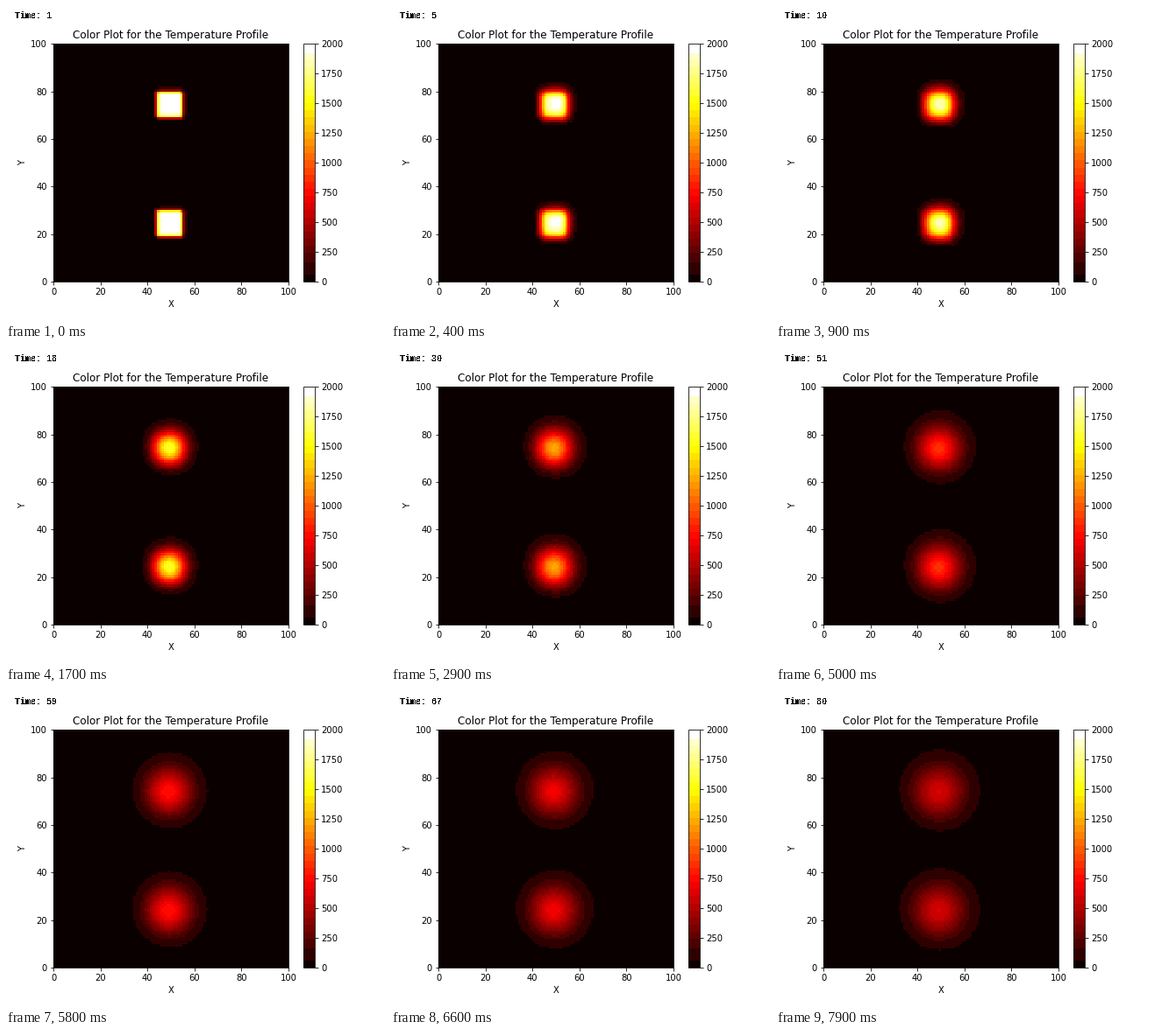
Write a matplotlib script that moves like this. It is 432 by 360 pixels and loops after 8 s.

```python
import numpy as np
import matplotlib.pyplot as plt
from matplotlib.animation import FuncAnimation
from matplotlib.colors import ListedColormap

W, H, DPI = 432, 360, 72
N, STEPS, T_MAX = 100, 80, 2000
R = 0.2  # diffusion number


def banded_hot(size=200):
    """The hot colormap reduced to flat bands."""
    edges = np.concatenate([[0, 60, 160], np.arange(240, 1960, 60), [T_MAX]])
    mids = (edges[:-1] + edges[1:]) / 2 / T_MAX
    mids[0], mids[-1] = 0, 1
    values = (np.arange(size) + 0.5) * T_MAX / size
    band = np.searchsorted(edges, values, side="right") - 1
    return ListedColormap(plt.get_cmap("hot")(mids[band]))


def simulate():
    """Explicit heat steps updated in place, sweeping right and up."""
    temp = np.zeros((N, N))
    for y in (19, 69):
        temp[y:y + 11, 44:55] = T_MAX
    # Solves the left-neighbour recursion of one row at once.
    sweep = np.linalg.inv(np.eye(N - 2) - R * np.eye(N - 2, k=-1))
    states = []
    for _ in range(STEPS):
        for i in range(1, N - 1):
            row = temp[i]
            rhs = (1 - 4 * R) * row[1:-1] + R * (
                row[2:] + temp[i + 1, 1:-1] + temp[i - 1, 1:-1])
            temp[i, 1:-1] = sweep @ rhs
        states.append(temp.copy())
    return states


states = simulate()

plt.rcParams["font.family"] = "DejaVu Sans"
fig = plt.figure(figsize=(W / DPI, H / DPI), dpi=DPI, facecolor="white")
fig.subplots_adjust(left=0.125, right=0.9, bottom=0.125, top=0.88)
ax = fig.add_subplot()
mesh = ax.pcolormesh(states[0], cmap=banded_hot(), vmin=0, vmax=T_MAX)
fig.colorbar(mesh, ax=ax)
ax.set(title="Color Plot for the Temperature Profile", xlabel="X", ylabel="Y",
       xlim=(0, N), ylim=(0, N))

clock = fig.text(10 / W, 1 - 14 / H, "", family="Liberation Mono",
                 weight="bold", size=10, va="baseline", antialiased=False)


def draw(k):
    mesh.set_array(states[k])
    clock.set_text(f"Time: {k + 1}")
    return mesh, clock


anim = FuncAnimation(fig, draw, frames=STEPS, interval=100, repeat=True,
                     repeat_delay=0, blit=False)
plt.show()
```
